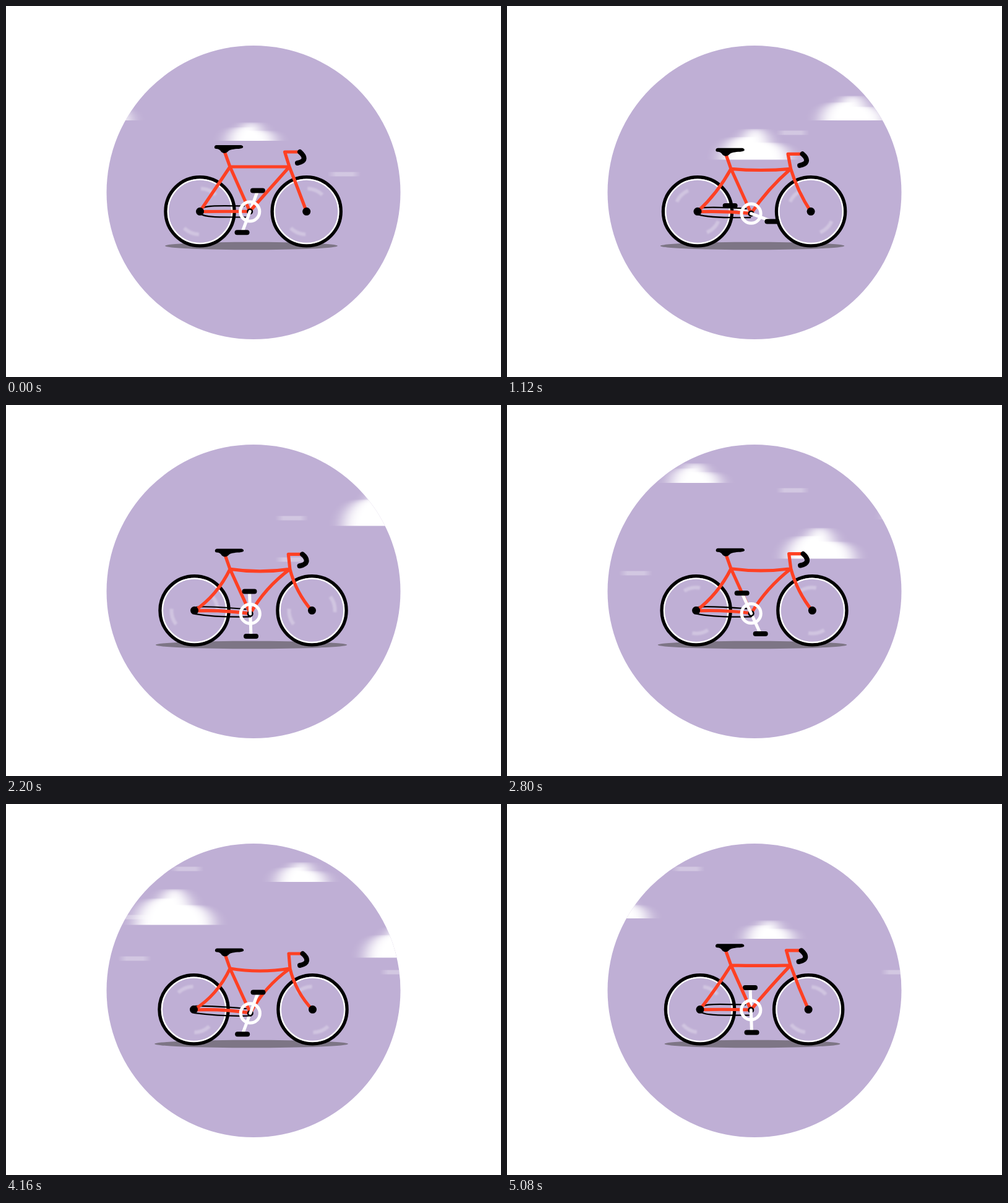
Animation of 800 by 600 pixels, one loop 5.12 s. Source, as an HTML page:

```html
<!DOCTYPE html>
<html lang="en">
<head>
<meta charset="utf-8">
<title>Bouncing bicycle</title>
<style>
  html, body { margin: 0; width: 100%; height: 100%; overflow: hidden; background: #fff; }
  svg { display: block; width: 100vw; height: 100vh; }
</style>
</head>
<body>
<svg viewBox="0 0 800 600" fill="none" stroke-linecap="round" stroke-linejoin="round">
  <defs>
    <clipPath id="disc"><circle cx="400" cy="301.5" r="237.5"/></clipPath>
    <filter id="speed" x="-60%" width="220%" y="0" height="100%" color-interpolation-filters="sRGB">
      <feGaussianBlur stdDeviation="12 0"/>
    </filter>
    <filter id="soft" x="-20%" y="-20%" width="140%" height="140%"><feGaussianBlur stdDeviation="1.2"/></filter>
    <linearGradient id="fade">
      <stop offset="0" stop-color="#fff" stop-opacity="0"/>
      <stop offset=".25" stop-color="#fff" stop-opacity=".3"/>
      <stop offset=".75" stop-color="#fff" stop-opacity=".3"/>
      <stop offset="1" stop-color="#fff" stop-opacity="0"/>
    </linearGradient>
    <g id="wheel">
      <circle r="55.5" stroke="#000" stroke-width="5.5"/>
      <circle r="51.7" stroke="#fff" stroke-width="2.4"/>
    </g>
    <path id="glint" d="M-13 -34.8A37 37 0 0 1 13 -34.8M-13 34.8A37 37 0 0 0 13 34.8"
      stroke="#fff" stroke-opacity=".27" stroke-width="6" stroke-linecap="butt" filter="url(#soft)"/>
    <g id="crank">
      <path d="M0 0V-36" stroke="#fff" stroke-width="5"/>
    </g>
  </defs>

  <g clip-path="url(#disc)">
    <rect width="800" height="600" fill="#bfafd5"/>
    <g id="streaks" fill="url(#fade)"></g>
    <g id="clouds" fill="#fff"></g>
  </g>

  <ellipse id="shadow" cx="396.5" cy="388" ry="6.3" fill="#7d7585"/>
  <g id="rear"><use href="#wheel"/><use href="#glint" class="spin"/></g>
  <g id="front"><use href="#wheel"/><use href="#glint" class="spin"/></g>
  <use id="backCrank" href="#crank"/>
  <path id="backPedal" d="M-8 0H8" stroke="#000" stroke-width="8"/>
  <path id="chain" stroke="#000" stroke-width="2.2"/>
  <path id="frame" stroke="#ff4023" stroke-width="5.2"/>
  <path id="saddle" fill="#000"/>
  <path id="bars" stroke="#000" stroke-width="8"/>
  <circle id="rearHub" r="6.5" fill="#000"/>
  <circle id="frontHub" r="6.5" fill="#000"/>
  <g id="ring">
    <circle r="5" fill="#000"/>
    <circle r="15.6" stroke="#fff" stroke-width="5"/>
  </g>
  <use id="frontCrank" href="#crank"/>
  <path id="frontPedal" d="M-8 0H8" stroke="#000" stroke-width="8"/>
</svg>
<script>
const STEP = 40, STEPS = 128, BOUNCE = 16;
const $ = id => document.getElementById(id);

function add(parent, tag, attrs) {
  const node = document.createElementNS('http://www.w3.org/2000/svg', tag);
  for (const key in attrs) node.setAttribute(key, attrs[key]);
  parent.append(node);
  return node;
}

// Each pass of scenery starts at one of these steps and runs its own clock.
const PASSES = [0, 46, 85];

// x at local step `at`, speed per step, baseline, half width, height
const CLOUDS = [
  { x: 272, at: 19, speed: 33.6, y: 195.5, w: 64, h: 58 },
  { x: 477, at: 19, speed: 34.6, y: 126, w: 40, h: 32 },
  { x: 558, at: 28, speed: 27.3, y: 185, w: 52, h: 40 },
  { x: 401, at: 28, speed: 26.1, y: 248.5, w: 56, h: 50 },
  { x: 452, at: 41, speed: 28, y: 218, w: 38, h: 30 }
];

// height and local step of entry; every streak comes twice per pass
const STREAKS = [[105, 15], [272, 19], [138, 22], [205, 26], [183, 30], [250, 30]]
  .flatMap(([y, at]) => [{ y, at }, { y, at: at + 23 }]);

const lobe = (x, rx, ry) => `M${x - rx} 0A${rx} ${ry} 0 0 1 ${x + rx} 0z`;

const scenery = PASSES.map(start => ({
  start,
  clouds: CLOUDS.map(c => ({
    ...c,
    node: add($('clouds'), 'path', {
      d: lobe(-c.w * .35, c.w * .62, c.h * .74) + lobe(0, c.w * .5, c.h) + lobe(c.w * .4, c.w * .58, c.h * .56),
      filter: 'url(#speed)'
    })
  })),
  streaks: STREAKS.map(s => ({
    ...s,
    node: add($('streaks'), 'rect', { y: s.y - 3.5, width: 54, height: 7 })
  }))
}));

const show = (node, on) => node.setAttribute('display', on ? 'inline' : 'none');

function drawScenery(step) {
  for (const { start, clouds, streaks } of scenery) {
    const local = (step - start + STEPS) % STEPS;
    for (const c of clouds) {
      const x = c.x - (local - c.at) * c.speed;
      show(c.node, x > 40 && x < 760);
      c.node.setAttribute('transform', `translate(${x} ${c.y})`);
    }
    for (const s of streaks) {
      const age = local - s.at;
      show(s.node, age >= 0 && age < 6);
      s.node.setAttribute('x', 604 - age * 84.6);
    }
  }
}

// Bike shapes at rest and fully squashed; both strings hold the same commands.
const POSES = {
  frame: [
    'M353 235L362 260L394 332 M362 260Q410 260 458 260 M458 260Q426 296 394 332' +
    'M362 260Q338 296 313.5 332 M313.5 332.5Q354 332 394 332 M473 236L450.5 236L458 260Q472 296 485.5 332',
    'M354 243L362 266L395 338 M362 266Q410 274 459 266 M459 266Q417 296 395 338' +
    'M362 266Q342 309 303.5 333 M303.5 333Q350 331 395 338 M477 242L457 242L459 266Q468 304 495.5 333'
  ],
  chain: [
    'M315 329C318 322 345 323 385 323.5 M315 336C320 342 345 341.5 390 341.5',
    'M305 327C312 326 345 327 388 331 M304 338C320 340 350 344 396 342.5'
  ],
  saddle: [
    'M340 225L380 225Q384 226 383 229Q380 231 373 231C365 232 361 232 358 236Q353 240 348 236Q345 231 340 231Q336 231 337 227Q338 225 340 225z',
    'M341 233.5L381 233.5Q385 234.5 384 237.5Q381 239.5 374 239.5C366 240.5 362 240.5 359 244.5Q354 248.5 349 244.5Q346 239.5 341 239.5Q337 239.5 338 235.5Q339 233.5 341 233.5z'
  ],
  bars: [
    'M475 236C483 243 486 251 471 254',
    'M479.5 242C488 249 490 258 475 261'
  ]
};

const mix = (a, b, k) => a + (b - a) * k;

function mixPath([a, b], k) {
  const ends = b.match(/[\d.]+/g);
  let i = 0;
  return a.replace(/[\d.]+/g, n => mix(+n, +ends[i++], k).toFixed(2));
}

const place = (id, x, y, turn = 0) =>
  $(id).setAttribute('transform', `translate(${x} ${y}) rotate(${turn})`);

function drawBike(step) {
  const beat = step % BOUNCE;
  const ramp = 1 - Math.abs(beat / 8 - 1);
  const squash = ramp * (1.2 - .2 * ramp);

  for (const id in POSES) $(id).setAttribute('d', mixPath(POSES[id], squash));
  $('shadow').setAttribute('rx', mix(139.5, 156.5, squash));

  const rearX = mix(313.5, 303.5, squash), frontX = mix(485.7, 495.5, squash);
  for (const id of ['rear', 'rearHub']) place(id, rearX, 332.3);
  for (const id of ['front', 'frontHub']) place(id, frontX, 332.3);
  for (const glint of document.querySelectorAll('.spin'))
    glint.setAttribute('transform', `rotate(${23 + beat * 84.375})`);

  const x = mix(394.2, 394.8, squash), y = mix(332.4, 338.4, squash);
  place('ring', x, y);
  const turn = 200.5 + step * 22.5;
  for (const [side, angle] of [['front', turn], ['back', turn + 180]]) {
    const a = angle * Math.PI / 180;
    place(side + 'Crank', x, y, angle);
    place(side + 'Pedal', x + 36.2 * Math.sin(a), y - 36.2 * Math.cos(a));
  }
}

function tick() {
  const step = Math.floor(performance.now() / STEP) % STEPS;
  drawScenery(step);
  drawBike(step);
  requestAnimationFrame(tick);
}
tick();
</script>
</body>
</html>
```
